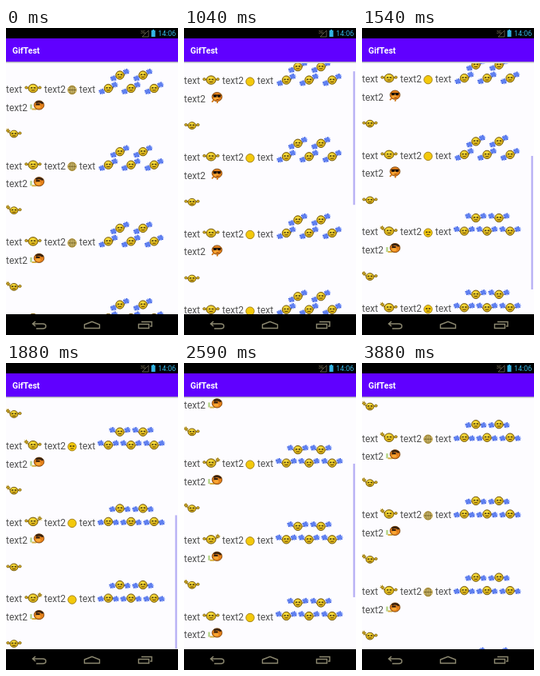
Animation of 216 by 384 pixels, one loop 3.92 s. Source, as an HTML page with a canvas:

```html
<!DOCTYPE html>
<html lang="en">
<head>
<meta charset="utf-8">
<title>GifTest</title>
<style>
html, body { margin: 0; width: 100%; height: 100%; overflow: hidden; background: #000; }
canvas { display: block; width: 216px; height: 384px; }
</style>
</head>
<body>
<canvas id="stage" width="216" height="384"></canvas>
<script>
const c = document.getElementById('stage').getContext('2d');
const LOOP = 3920, STEP = 250, ROW = 95.7;

// [time, scroll offset]
const scrollKeys = [[0, 0], [960, 0], [1040, 10], [1200, 78], [1400, 160], [1540, 204],
  [1700, 240], [1900, 262], [2110, 262], [2200, 250], [2290, 228], [2440, 183],
  [2590, 142], [2750, 111], [2920, 91], [3130, 79], [3240, 78], [LOOP, 78]];

// One pose per step. S: both hands level, L/R: that hand waves.
const poses = {
  wave:  'SLRLSRSLRSRSSRSL',
  small: 'LSRLSRSLSLLSLSRL',
  cheer: 'TUDTTUTUDUUUDTUD', // Tilted, Up, Down
  ball:  'GPFGPFPFPGPPPGPG', // Globe, Plain, Face
  drink: 'DDCCCCCDDDDDDDDD'  // Drinking, Cool
};

function scrollAt(t) {
  const i = scrollKeys.findIndex(k => k[0] > t);
  const [t0, a] = scrollKeys[i - 1], [t1, b] = scrollKeys[i];
  return a + (b - a) * (t - t0) / (t1 - t0);
}

function rect(x, y, w, h, color) {
  c.fillStyle = color;
  c.fillRect(x, y, w, h);
}

function oval(x, y, rx, ry, color, edge) {
  c.beginPath();
  c.ellipse(x, y, rx, ry, 0, 0, 7);
  c.fillStyle = color;
  c.fill();
  if (edge) {
    c.strokeStyle = edge;
    c.lineWidth = 0.9;
    c.stroke();
  }
}

function path(d, color, width = 1) {
  c.strokeStyle = color;
  c.lineWidth = width;
  c.stroke(new Path2D(d));
}

function text(s, x, y, font, color) {
  c.font = font + ' Roboto, sans-serif';
  c.fillStyle = color;
  c.fillText(s, x, y);
}

function at(x, y, draw) {
  c.save();
  c.translate(x, y);
  draw();
  c.restore();
}

function head(rx, ry) {
  oval(0, 0, rx, ry, '#d9b21a', '#6e540c');
  oval(-0.5, -1.5, rx * 0.6, ry * 0.5, '#f6dc3c');
}

function face() {
  rect(-3, -1.5, 2.4, 1.6, '#54420c');
  rect(0.6, -1.5, 2.4, 1.6, '#54420c');
  path('M-2 2.3H2', '#6b4a08');
}

function waver(x, y, r, pose) {
  at(x, y, () => {
    for (const side of [-1, 1]) {
      const up = pose === (side < 0 ? 'L' : 'R');
      const hx = side * (r + 2.5), hy = up ? -4 : -1;
      path(`M${side * (r - 1)} 0L${hx} ${hy}`, '#8a6810', 1.3);
      if (up) path(`M${hx - 3} ${hy}h6M${hx} ${hy - 3}v6M${hx - 2.3} ${hy - 2.3}l4.6 4.6`, '#c9a424');
      oval(hx, hy, 1.7, 1.5, '#dcb520', '#7c6014');
    }
    head(r, r * 0.88);
    face();
  });
}

function pompom(x, y) {
  oval(x, y, 3.2, 2.8, '#5f80f0');
  for (let i = 0; i < 9; i++) {
    const a = i * 0.7;
    rect(x + 3.5 * Math.cos(a) - 0.7, y + 3 * Math.sin(a) - 0.7, 1.4, 1.4, i % 2 ? '#2f50dc' : '#8fa8fc');
  }
}

function cheerer(x, y, pose) {
  at(x, y, () => {
    const reach = pose === 'T' ? 8 : 9.5;
    const left = { T: 4, U: -2.5, D: 1 }[pose], right = pose === 'T' ? -4.5 : left;
    path(`M-5 1L${-reach} ${left}M5 1L${reach} ${right}`, '#8a6810');
    pompom(-reach, left);
    pompom(reach, right);
    head(5.2, 5.2);
    face();
  });
}

function ball(x, y, pose) {
  at(x, y, () => {
    oval(0, 0, 5.2, 5.2, pose === 'G' ? '#dcc878' : '#f3c90c', '#a07c14');
    if (pose === 'G') path('M-5 0H5M0-5V5M-2-4.5Q-4 0-2 4.5M2-4.5Q4 0 2 4.5', '#65541c', 0.8);
    if (pose === 'F') face();
  });
}

function drinker(x, y, pose) {
  at(x, y, () => {
    const drinking = pose === 'D';
    if (drinking) {
      path('M-10-1v6', '#b5d488', 2.5);
      path('M-9 5h5l4-3', '#d8b040', 2);
    }
    oval(0, 0, 6.3, 5.6, '#e5801a', '#7c440c');
    oval(-1, 2, 3, 2, '#f8a733');
    if (drinking) {
      path('M-4-3Q1-6 5-2', '#38220e', 2.5);
      rect(-4, -2, 5, 2, '#2a1a0c');
    } else {
      rect(-5, -2.5, 10, 1.2, '#181008');
      rect(-4.5, -2.5, 4, 3, '#181008');
      rect(0.5, -2.5, 4, 3, '#181008');
      path('M-1 3.5h3', '#8a3808');
      path('M-4 4l-2.5 2.5M1 5l-1 3', '#d07818', 1.8);
    }
  });
}

function block(y, k, step) {
  const pose = name => poses[name][(step + (k > 3 ? 1 : 0)) % 16];
  const body = (s, x, dy) => text(s, x, y + dy, '12px', '#505050');
  body('text', 0, 4.8);
  body('text2', 48, 4.8);
  body('text', 92, 4.8);
  body('text2', 0, 27.5);
  waver(34, y - 0.5, 6, pose('wave'));
  ball(83, y + 1.5, pose('ball'));
  for (const x of [143, 172]) cheerer(x, y - 17, pose('cheer'));
  for (const x of [128.5, 157, 186]) cheerer(x, y - 0.5, pose('cheer'));
  drinker(41.5, y + 20.5, pose('drink'));
  waver(10, y + 56.5, 5, pose('small'));
}

function chrome() {
  rect(0, 0, 216, 13, '#000');
  rect(0, 13, 216, 29, '#6000ff');
  rect(0, 42, 216, 1, '#aaa6bc');
  rect(0, 43, 216, 1, '#dcdae6');
  text('GifTest', 8, 32, 'bold 10.5px', '#fff');
  text('14:06', 191, 10, '9px', '#33b5e5');
  text('3G', 169, 7, '5px', '#8a8060');
  path('M171 11L179 3V11Z', '#5c5848');
  rect(184, 2, 2, 1, '#33b5e5');
  rect(182.5, 3, 5, 8, '#33b5e5');

  rect(0, 358, 216, 26, '#000');
  const gray = '#8c8870';
  path('M37 367l-3.5 3 3.5 3M34 370H46Q50 370 50 373T46 376H38', gray, 1.5);
  path('M98.5 371L108 367.3L117.5 371V375.5H98.5Z', gray, 1.4);
  path('M166.5 370.5h13v5h-13zM170 367.5h13v5.5h-2', gray, 1.4);
}

function draw(t) {
  const s = scrollAt(t);
  rect(0, 0, 216, 384, '#fdfcff');
  for (let k = 0; k < 6; k++) block(76 + k * ROW - s, k, Math.floor(t / STEP));
  c.globalAlpha = t < 960 ? 0 : Math.max(0, Math.min(1, (3700 - t) / 250));
  rect(212.5, 48.5 + s * 0.546, 2.2, 167, '#b3abf4');
  c.globalAlpha = 1;
  chrome();
}

const start = performance.now();
function tick() {
  draw((performance.now() - start) % LOOP);
  requestAnimationFrame(tick);
}
tick();
</script>
</body>
</html>
```
